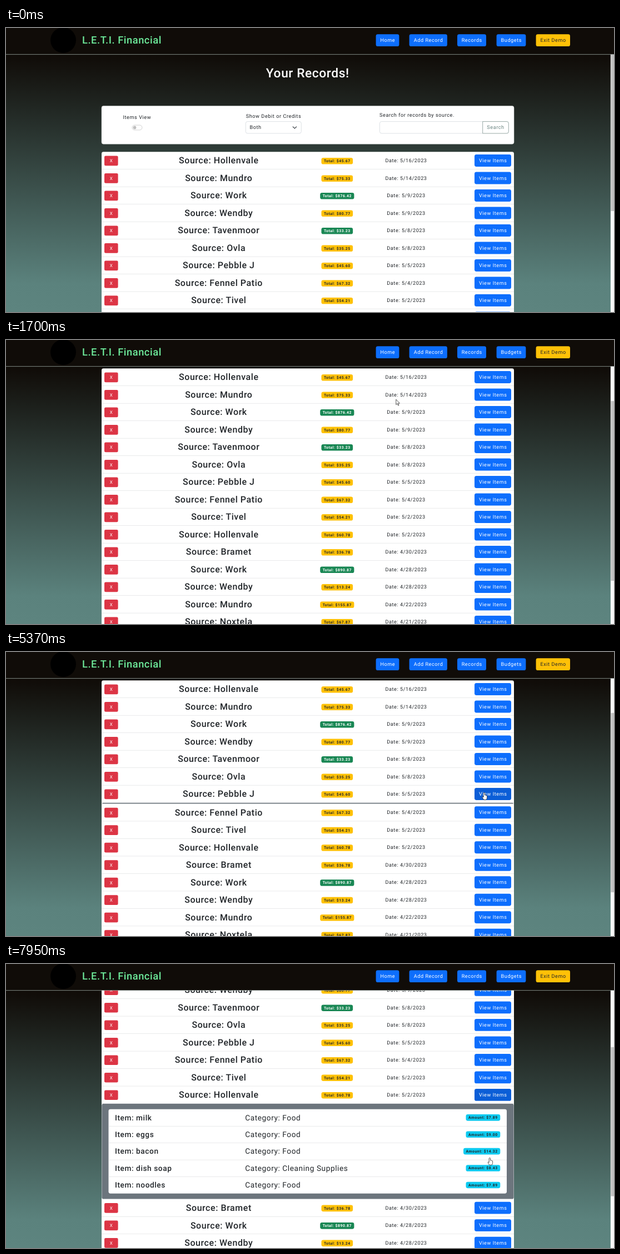
An HTML page for the animation above (8 s loop, 1094x512 px).

```html
<!DOCTYPE html>
<html lang="en">
<head>
<meta charset="utf-8">
<title>Your Records</title>
<style>
  html, body { margin: 0; width: 100%; height: 100%; overflow: hidden; background: #100c08; }
  #stage { display: block; width: 100vw; height: 100vh; }
  text {
    font-family: Roboto, sans-serif; letter-spacing: .57px; fill: #212529;
    white-space: pre; text-rendering: geometricPrecision;
  }
</style>
</head>
<body>
<svg id="stage" viewBox="0 0 1094 512"></svg>
<script>
const LOOP = 8000, ROW_H = 31.5, FIRST_Y = 239, ITEM_H = 30.4;
const BLUE = '#0d6efd', HOVER = '#0b5ed7', ACTIVE = '#0a58ca';
const YELLOW = '#ffc107', GREEN = '#198754', CYAN = '#0dcaf0', INK = '#212529';

const records = [
  ['Hollenvale', '45.67', '5/16'], ['Mundro', '75.33', '5/14'], ['Work', '876.42', '5/9'],
  ['Wendby', '80.77', '5/9'], ['Tavenmoor', '33.23', '5/8', true], ['Ovla', '35.25', '5/8'],
  ['Pebble J', '45.60', '5/5'], ['Fennel Patio', '67.32', '5/4'], ['Tivel', '54.21', '5/2'],
  ['Hollenvale', '60.78', '5/2'], ['Bramet', '36.78', '4/30'], ['Work', '890.87', '4/28'],
  ['Wendby', '13.24', '4/28'], ['Mundro', '155.87', '4/22'], ['Noxtela', '67.87', '4/21']
];
const details = {
  6: [['gas', 'Transportation / Car', '45.60']],
  9: [['milk', 'Food', '7.89'], ['eggs', 'Food', '9.00'], ['bacon', 'Food', '14.32'],
      ['dish soap', 'Cleaning Supplies', '8.43'], ['noodles', 'Food', '7.89']]
};

// Markup helpers; cy is the middle of the line box
const text = (x, cy, size, str, attrs = '') =>
  `<text x="${x}" y="${cy + size * .3415}" font-size="${size}" ${attrs}>${str}</text>`;
const mid = (x, cy, size, str, attrs = '') => text(x, cy, size, str, `text-anchor="middle" ${attrs}`);
const box = (x, y, w, h, fill, r = 0, attrs = '') =>
  `<rect x="${x}" y="${y}" width="${w}" height="${h}" rx="${r}" fill="${fill}" ${attrs}/>`;
const fillOf = color => `style="fill:${color}"`;
const button = (x, cy, w, label, bg, color = '#fff') =>
  box(x, cy - 10.9, w, 21.8, bg, 3.4, 'class="btn"') + mid(x + w / 2 + .28, cy, 9.12, label, fillOf(color));
const badge = (x, cy, label, bg, color, anchor) =>
  `<g class="badge" data-x="${x}" data-anchor="${anchor}">` + box(x, cy - 5.8, 0, 11.6, bg, 3.4) +
  text(x, cy, 6.84, label, `font-weight="700" ${fillOf(color)}`) + '</g>';
const line = (x, y, w) => box(x, y, w, .57, '#d9dadc');

function recordRow([name, total, date, credit]) {
  const income = credit || name === 'Work';
  return '<g class="row">' + line(172, 15.4, 742) +
    box(177, -8.5, 24.6, 17.7, '#dc3545', 2.3) + mid(189.5, .5, 7.98, 'X', fillOf('#fff')) +
    mid(382.8, 0, 15.96, 'Source: ' + name, 'font-weight="500"') +
    badge(595.8, .8, 'Total: $' + total, income ? GREEN : YELLOW, income ? '#fff' : INK, 'middle') +
    mid(720, 0, 9.12, `Date: ${date}/2023`) +
    button(843, 0, 66, 'View Items', BLUE) + '</g>';
}

function panel(index, items) {
  const h = panelHeight(index);
  const rows = items.map(([item, category, amount], i) => {
    const cy = 25.2 + i * ITEM_H;
    return text(196, cy, 13.68, 'Item: ' + item, 'font-weight="500"') +
      text(430.2, cy, 13.68, 'Category: ' + category) +
      badge(889.3, cy, 'Amount: $' + amount, CYAN, INK, 'end') +
      (i ? line(184.5, cy - ITEM_H / 2, 716.5) : '');
  }).join('');
  return `<svg id="panel${index}" x="0" width="1094" height="0" overflow="hidden">` +
    box(172.4, 0, 741.2, h, '#6c757d', 3.4) +
    box(184.5, 10, 716.5, items.length * ITEM_H, '#fff', 3.4) + rows + '</svg>';
}

const panelHeight = index => 20.2 + ITEM_H * details[index].length;

const filters = box(172, 140.6, 742, 68.6, '#fff', 3.4, 'stroke="#d5d8d8" stroke-width=".57"') +
  mid(235.8, 161, 9.12, 'Items View') +
  box(227, 175.1, 17.9, 8.8, '#fff', 4.4, 'stroke="#bfbfbf" stroke-width=".7"') +
  '<circle cx="231.5" cy="179.5" r="2.9" fill="#bfbfbf"/>' +
  mid(481.5, 159.2, 9.12, 'Show Debit or Credits') +
  box(431.3, 168.6, 100, 21.4, '#fff', 3.4, 'stroke="#ced4da" stroke-width=".7"') +
  text(438.4, 179.3, 9.12, 'Both') +
  '<path d="M516.2 178l3.2 3.1 3.2-3.1" fill="none" stroke="#343a40" stroke-width="1.1" stroke-linecap="round"/>' +
  text(672, 156.7, 9.12, 'Search for records by source.') +
  box(672.4, 168.6, 188, 21.4, '#fff', 3.4, 'stroke="#ced4da" stroke-width=".7"') +
  '<path d="M857.7 168.6h43.4q3.2 0 3.2 3.2v15q0 3.2-3.2 3.2h-43.4z" fill="#fff" stroke="#6a8480" stroke-width=".7"/>' +
  mid(881, 179.3, 9.12, 'Search', fillOf('#6a8480'));

const nav = [['Home', 665.6, 41.8], ['Add Record', 725.6, 68.3], ['Records', 812, 52],
  ['Budgets', 882.6, 52.8], ['Exit Demo', 953.6, 61.4, YELLOW, INK]];

const stage = document.getElementById('stage');
stage.innerHTML = `
  <defs><linearGradient id="bg" gradientUnits="userSpaceOnUse" x1="0" y1="0" x2="0" y2="512">
    <stop offset=".1" stop-color="#100c08"/><stop offset=".9" stop-color="#5b827d"/>
    <stop offset="1" stop-color="#5d847f"/></linearGradient></defs>
  ${box(0, 0, 1094, 512, 'url(#bg)')}
  <g id="page">
    ${mid(542.8, 81, 22.8, 'Your Records!', 'font-weight="500" ' + fillOf('#fff'))}
    ${filters}
    ${box(172, 223.3, 742, 900, '#fff', 3.4)}
    ${records.map(recordRow).join('')}
    ${Object.keys(details).map(i => panel(i, details[i])).join('')}
  </g>
  ${box(1087.8, 0, 6.2, 512, '#f8f8f8')}
  ${box(1088.4, 0, 5.6, 0, '#c1c1c1', 0, 'id="thumb"')}
  ${box(0, 0, 1094, 47.5, '#100c08')}
  ${box(0, 47.3, 1094, .8, '#99a5a1')}
  <circle cx="103" cy="22" r="23" fill="#000"/>
  ${text(137, 21.8, 18.24, 'L.E.T.I. Financial', 'font-weight="500" ' + fillOf('#6eeb9b'))}
  ${nav.map(([label, x, w, bg = BLUE, color]) => button(x, 22.2, w, label, bg, color)).join('')}
  <g id="cursor" stroke="#111" stroke-width=".7" stroke-linejoin="round" fill="#fff">
    <circle id="click" cx="-1" cy="2" r="6.8" fill="#d8d800" fill-opacity=".55" stroke="none"/>
    <path id="arrow" d="M0 0V9.5L2.2 7.5 3.8 11 5.2 10.4 3.7 7H6.6Z"/>
    <path id="hand" d="M-1.2 1Q-1.2 0 0 0 1.2 0 1.2 1V4.5Q2 4 2.6 4.8 3.5 4.4 4 5.2 5.2 5 5.2 6.2V9Q5.2 13 2.5 13H.6Q-1 13-2 11L-3.4 8Q-3 6.6-1.2 8.2Z"/>
  </g>`;

// Badges hug their label
for (const g of stage.querySelectorAll('.badge')) {
  const [rect, label] = g.children, pad = 4.45;
  const w = label.getComputedTextLength() + pad * 2;
  const x = g.dataset.x - (g.dataset.anchor === 'end' ? w : w / 2);
  rect.setAttribute('x', x);
  rect.setAttribute('width', w);
  label.setAttribute('x', x + pad);
}

const $ = id => document.getElementById(id);
const set = (node, attrs) => { for (const k in attrs) node.setAttribute(k, attrs[k]); };
const rows = [...stage.querySelectorAll('.row')];
const rowButtons = rows.map(r => r.querySelector('.btn'));

const progress = (t, a, b) => Math.min(1, Math.max(0, (t - a) / (b - a)));
const smooth = u => u * u * (3 - 2 * u);

// CSS "ease"
function ease(u) {
  let lo = 0, hi = 1, s = u;
  for (let i = 0; i < 20; i++) {
    s = (lo + hi) / 2;
    if (.75 * s * (1 - s) + s ** 3 < u) lo = s; else hi = s;
  }
  return .3 * (1 - s) ** 2 * s + 3 * (1 - s) * s * s + s ** 3;
}

const cursorPath = [[180, 1024, 443], [580, 668, 75.6], [1600, 668, 75.6], [1820, 745, 147.4],
  [1890, 745, 147.4], [2540, 856, 253.5], [2800, 856, 253.5], [2930, 860.4, 253.5],
  [5460, 860.4, 253.5], [5780, 865, 339.6], [5840, 865, 343], [6180, 865, 343], [6370, 870.4, 349.5]];

function cursorAt(t) {
  const next = cursorPath.findIndex(p => p[0] > t);
  if (next < 1) return cursorPath[next < 0 ? cursorPath.length - 1 : 0].slice(1);
  const [t0, x0, y0] = cursorPath[next - 1], [t1, x1, y1] = cursorPath[next];
  const u = smooth(progress(t, t0, t1));
  return [x0 + (x1 - x0) * u, y0 + (y1 - y0) * u];
}

const clicks = [3190, 4980, 6700];

function render(t) {
  const scroll = 172 * smooth(progress(t, 1030, 1635)) + 114.6 * smooth(progress(t, 7380, 7945));
  const open = {
    6: panelHeight(6) * (ease(progress(t, 3306, 3655)) - ease(progress(t, 5100, 5455))),
    9: panelHeight(9) * ease(progress(t, 6800, 7150))
  };
  const extra = open[6] + open[9];
  const rowY = i => FIRST_Y + i * ROW_H + (i > 6 ? open[6] : 0) + (i > 9 ? open[9] : 0);

  $('page').setAttribute('transform', `translate(0 ${-scroll})`);
  rows.forEach((row, i) => row.setAttribute('transform', `translate(0 ${rowY(i)})`));
  for (const i in open) set($('panel' + i), { y: rowY(+i) + 15.75, height: Math.max(0, open[i]) });

  const shrink = 838 / (838 + extra);
  set($('thumb'), { y: 6 + scroll * .605 * shrink, height: 324 * shrink });

  // Hover stays on the last row while the wheel turns
  const [x, y] = cursorAt(t), shown = t >= 180;
  const over = t >= 7380 ? 9 : shown && x >= 843 && x <= 909
    ? rows.findIndex((_, i) => Math.abs(rowY(i) - scroll - y) < 10.9) : -1;
  const pressed = clicks.some(c => t >= c + 60 && t < c + 150);
  rowButtons.forEach((b, i) => b.setAttribute('fill', i !== over ? BLUE : pressed ? ACTIVE : HOVER));

  set($('cursor'), { transform: `translate(${x} ${y})`, visibility: shown ? 'visible' : 'hidden' });
  set($('hand'), { display: over >= 0 ? 'inline' : 'none' });
  set($('arrow'), { display: over >= 0 ? 'none' : 'inline' });
  set($('click'), { display: clicks.some(c => t >= c && t < c + 120) ? 'inline' : 'none' });
}

const start = performance.now();
function frame() {
  render((performance.now() - start) % LOOP);
  requestAnimationFrame(frame);
}
frame();
</script>
</body>
</html>
```
